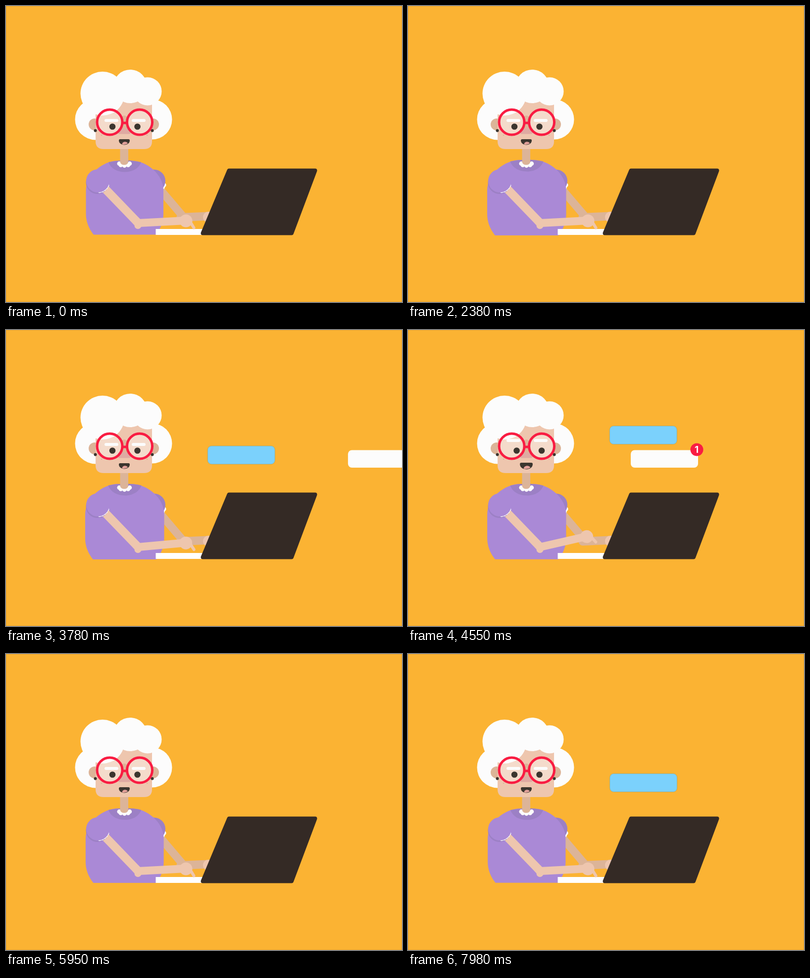
An HTML page for the animation above (8 s loop, 800 px wide and 600 px high).

```html
<!DOCTYPE html>
<html lang="en">
<head>
<meta charset="utf-8">
<title>Chatting at the laptop</title>
<style>
  html, body { margin: 0; width: 100%; height: 100%; overflow: hidden; background: #fbb333; }
  svg { display: block; width: 800px; height: 600px; }
  .skin { fill: #eec6ae; }
  .shade { fill: #dcb498; }
  .hair { fill: #fcfcfc; }
  .dark { fill: #3b352e; }
  .dress { fill: #aa89d6; }
  .fold { fill: #9c80c5; }
  .limb { fill: none; stroke: #eec6ae; stroke-linecap: round; }
  .limb.far { stroke: #dcb498; }
  .lens { fill: #fff; fill-opacity: .36; }
  .frame { fill: none; stroke: #f91c42; stroke-width: 5; }
  text { font: 700 19px Inter, sans-serif; fill: #fff; text-anchor: middle; }
</style>
</head>
<body>
<svg viewBox="0 0 800 600">
  <rect width="800" height="600" fill="#fbb333"/>
  <rect x=".5" y=".5" width="799" height="599" fill="none" stroke="#eaa733"/>

  <!-- far arm -->
  <path class="limb far" stroke-width="16" d="M308 368L358 427"/>
  <g id="farArm">
    <path class="limb far" stroke-width="17" stroke-linecap="butt" d="M353 428.500L408 426"/>
    <circle class="skin" cx="409" cy="428" r="11"/>
  </g>
  <g class="hair"><circle cx="317" cy="367" r="4"/><circle cx="319.500" cy="363" r="4"/></g>
  <circle class="fold" cx="299" cy="354.500" r="23"/>

  <!-- body -->
  <g id="torso">
    <path class="dress" d="M177 463.500Q161.500 444 161.500 421V374C161.500 341 196 313.500 227 313.500H253C284 313.500 318 341 318 374V421Q318 444 303 463.500Z"/>
    <path class="fold" d="M207 316.500Q240 309.500 273 316.500C268 330 255 336.500 240 336.500S212 330 207 316.500Z"/>
  </g>
  <g id="collar" class="hair"></g>
  <rect class="shade" x="230.500" y="280" width="16.500" height="42" rx="7"/>

  <!-- head -->
  <g class="hair"><circle cx="181" cy="230" r="41.500"/><circle cx="295" cy="230" r="40.500"/></g>
  <g class="shade"><circle cx="179" cy="240" r="12"/><circle cx="297" cy="240" r="12"/></g>
  <path class="skin" d="M181 180H295V274Q295 290 279 290H197Q181 290 181 274Z"/>
  <g class="hair">
    <circle cx="195" cy="177.500" r="44.500"/><circle cx="251" cy="163" r="34"/><circle cx="286" cy="173" r="28.500"/>
  </g>
  <g class="dark"><circle cx="180.500" cy="252.500" r="3"/><circle cx="295.500" cy="252.500" r="3"/></g>
  <g class="shade"><circle cx="193" cy="262" r="1.300"/><circle cx="285" cy="262" r="1.300"/></g>
  <g class="lens"><circle cx="209.500" cy="235.500" r="25.500"/><circle cx="270" cy="235.500" r="25.500"/></g>
  <path class="shade" d="M233 226Q239 218 245 226V250H233Z"/>
  <rect x="226" y="248" width="26" height="11.500" rx="4" fill="#dfaaa2"/>
  <g class="frame">
    <circle cx="209.500" cy="235.500" r="25.500"/><circle cx="270" cy="235.500" r="25.500"/><path d="M235 237H245"/>
  </g>
  <g id="brows" class="hair">
    <rect x="199" y="229" width="28" height="6" rx="3"/><rect x="254" y="229" width="28" height="6" rx="3"/>
  </g>
  <g id="pupils" class="dark"><circle cx="215" cy="244.500" r="6.300"/><circle cx="265.500" cy="244.500" r="6.300"/></g>
  <g id="mouth">
    <path class="dark" d="M230.500 270H247.500Q250 270 250 272.500C250 278 245 281.500 239 281.500S228 278 228 272.500Q228 270 230.500 270Z"/>
    <path fill="#e2a09a" d="M234.500 280.500C234.500 274.500 244 273.500 246 278.500Q241 282 234.500 280.500Z"/>
  </g>

  <!-- near arm and desk -->
  <path fill="#fff" d="M302.500 452H400V464H302.500Z"/>
  <path class="limb" stroke-width="17" d="M195 365L267 440"/>
  <circle class="skin" cx="266.500" cy="445" r="7"/>
  <g id="nearArm">
    <path class="limb" stroke-width="16" d="M267 440L363 435"/>
    <path class="limb" stroke-width="6" d="M370 434L379.500 449.500"/>
    <circle class="skin" cx="363.500" cy="435.500" r="13"/>
  </g>
  <circle class="fold" cx="184.500" cy="358" r="23"/>
  <g id="cuff" class="hair"></g>
  <circle class="dress" cx="185.500" cy="354.500" r="23.500"/>
  <path fill="#342a25" stroke="#342a25" stroke-width="8" stroke-linejoin="round" d="M450.500 333.500H624.500L577 460.500H397.500Z"/>

  <!-- messages -->
  <rect id="sent" x="407.300" y="242.500" width="136" height="37" rx="8" fill="#7bd1fc" stroke="#a3a36c" stroke-width=".7"/>
  <g id="reply">
    <rect class="hair" x="450" y="243.500" width="136" height="35.500" rx="8"/>
    <g id="badge">
      <circle cx="583.500" cy="242.500" r="13" fill="#f91c42"/>
      <text x="583" y="249.300">1</text>
    </g>
  </g>
</svg>
<script>
const LOOP = 8000, CYCLE = 5110, STEP = 70;
const SENT_AT = 2380, REPLY_AT = 3745, SMILE_AT = 3920;

const el = id => document.getElementById(id);
const place = (id, transform) => el(id).setAttribute("transform", transform);
const show = (id, on) => el(id).setAttribute("visibility", on ? "visible" : "hidden");
const scaleAt = (x, y, s) => `translate(${x} ${y}) scale(${s}) translate(${-x} ${-y})`;

// five lace bumps along an arc, angles in degrees
function lace(id, cx, cy, rx, ry, from, to) {
  for (let i = 0; i < 5; i++) {
    const a = (from + (to - from) * i / 4) * Math.PI / 180;
    const x = cx + rx * Math.cos(a), y = cy + ry * Math.sin(a);
    el(id).insertAdjacentHTML("beforeend", `<circle cx="${x}" cy="${y}" r="4.4"/>`);
  }
}
lace("collar", 239.3, 319.5, 10.5, 4, 180, 0);
lace("cuff", 185.5, 354.5, 20.5, 20.5, 80, 26);

function ease(t, from, length) {
  const p = Math.min(1, Math.max(0, (t - from) / length));
  return p * p * (3 - 2 * p);
}
const wave = turns => Math.sin(Math.PI * turns) ** 2;
const taps = (t, from, period, count) =>
  t > from && t < from + period * count ? wave((t - from) / period) : 0;
const slideIn = t => 400 * Math.exp(-Math.max(0, t) / 69);

function draw(now) {
  const t = Math.floor((now % LOOP) / STEP) * STEP % CYCLE;
  const joy = ease(t, SMILE_AT, 280) - ease(t, 4830, 210);
  const glance = ease(t, 840, 140) - ease(t, 1190, 210);
  const typing = taps(t, 1050, 280, 4) + taps(t, 3115, 574, 3);

  place("torso", scaleAt(240, 389, 1 + .02 * wave(t / 690)));
  place("nearArm", `rotate(${-10 * typing} 267 441)`);
  place("farArm", `rotate(${-9 * taps(t, 910, 280, 5)} 358 428)`);
  place("pupils", `translate(${glance + 4.5 * joy} 0)`);
  place("brows", `translate(0 ${-8 * joy})`);
  place("mouth", scaleAt(239, 276, 1 + .18 * joy));

  show("sent", t > SENT_AT);
  place("sent", `translate(${slideIn(t - SENT_AT)} ${-48 * ease(t, REPLY_AT - 35, 280)})`);
  show("reply", t > REPLY_AT);
  place("reply", `translate(${slideIn(t - REPLY_AT)} 0)`);
  place("badge", scaleAt(583.5, 242.5, ease(t, REPLY_AT + 315, 140)));
}

const start = performance.now();
(function tick() {
  draw(performance.now() - start);
  requestAnimationFrame(tick);
})();
</script>
</body>
</html>
```
